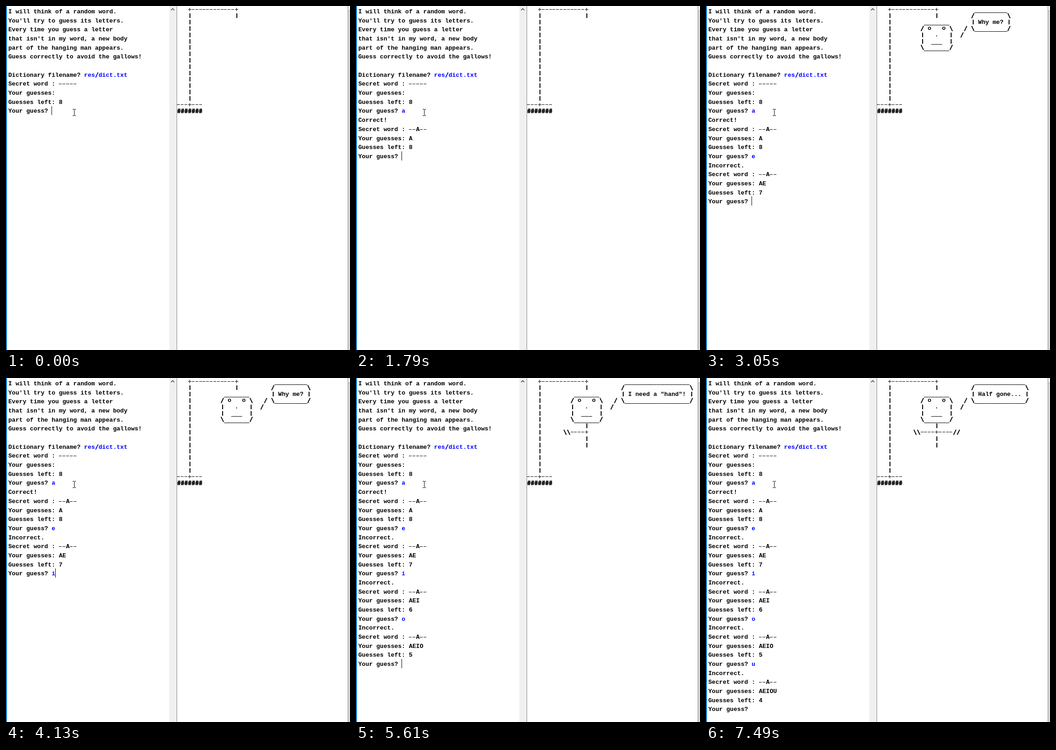
An HTML page with a canvas that plays this animation: 748x748 px, repeating every 7.99 s.

```html
<!DOCTYPE html>
<html lang="en">
<head>
<meta charset="utf-8">
<title>Hangman</title>
<style>
  html, body { margin: 0; width: 100%; height: 100%; overflow: hidden; background: #fff; }
  canvas { display: block; }
</style>
</head>
<body>
<canvas id="stage" width="748" height="748"></canvas>
<script>
const ctx = document.getElementById('stage').getContext('2d');
const LOOP = 7990;
const CELL = 7.85;
const LINE = 19.68;
const ROW = 13.8;
const BLUE = '#0000ff';

const INTRO = [
  'I will think of a random word.',
  "You'll try to guess its letters.",
  'Every time you guess a letter',
  "that isn't in my word, a new body",
  'part of the hanging man appears.',
  'Guess correctly to avoid the gallows!',
  ''
];
const LETTERS = 'aeiou';
const SPEECH = ['Why me?', "I'm scared!", 'I need a "hand"!', 'Half gone...'];

// [start ms, rounds finished, letter typed, caret shown]
const STEPS = [
  [0, 0, 0, 1], [410, 0, 0, 0], [970, 0, 0, 1], [1350, 0, 1, 1],
  [1790, 1, 0, 1], [2290, 1, 0, 0], [2670, 1, 1, 1],
  [3050, 2, 0, 1], [3550, 2, 0, 0], [4050, 2, 0, 1], [4130, 2, 1, 1],
  [4470, 3, 0, 1], [4990, 3, 0, 0], [5230, 3, 1, 1],
  [5610, 4, 0, 1], [6110, 4, 0, 0], [6490, 4, 1, 1],
  [6990, 5, 0, 1], [7490, 5, 0, 0]
];

function rect(color, x, y, w, h) {
  ctx.fillStyle = color;
  ctx.fillRect(x, y, w, h);
}

function stroke(color, width, ...points) {
  ctx.strokeStyle = color;
  ctx.lineWidth = width;
  ctx.beginPath();
  points.forEach(([x, y], i) => i ? ctx.lineTo(x, y) : ctx.moveTo(x, y));
  ctx.stroke();
}

// Line-like characters are drawn as strokes; x is the cell's left, y its middle.
function glyph(ch, x, y, color) {
  const mid = Math.floor(x + CELL / 2);
  const my = Math.round(y);
  const top = Math.floor(y) - 4;
  switch (ch) {
    case ' ': break;
    case '-': rect(color, mid - 3, my, 6, 1); break;
    case '+':
      rect(color, mid - 3, my, 7, 1);
      rect(color, mid, my - 3, 1, 7);
      break;
    case '_': rect(color, x, Math.floor(y + 7.3), CELL + 0.1, 1); break;
    case '|': rect(color, mid, top, 2, 10); break;
    case '/': stroke(color, 1.8, [x + 1.5, top + 10.5], [x + 6.8, top - 0.5]); break;
    case '\\': stroke(color, 1.8, [x + 1.5, top - 0.5], [x + 6.8, top + 10.5]); break;
    case '#':
      stroke(color, 2, [x + 2, my + 5], [x + 3.3, my - 5]);
      stroke(color, 2, [x + 4.8, my + 5], [x + 6.1, my - 5]);
      rect(color, x + 0.4, my - 2, 7.2, 1.5);
      rect(color, x + 0.4, my + 1, 7.2, 1.5);
      break;
    default:
      ctx.fillStyle = color;
      ctx.fillText(ch, x, Math.round(y + 4));
  }
}

function write(str, x, y, color = '#000') {
  [...str].forEach((ch, i) => glyph(ch, x + i * CELL, y, color));
}

function art(row, col, str) {
  write(str, 372 + col * CELL, 7 + row * ROW);
}

function bars(col, from, to) {
  for (let r = from; r <= to; r++) art(r, col, '|');
}

function drawFrame() {
  rect('#fff', 0, 0, 748, 748);
  rect('#0078d7', 0, 0, 2, 748);
  rect('#f0f0f0', 355, 0, 16, 748);
  rect('#828282', 371, 0, 1, 748);
  rect('#828282', 743, 0, 1, 748);
  rect('#f0f0f0', 744, 0, 4, 10);
  rect('#a8a8a8', 744, 10, 4, 1);
  rect('#d8d8d8', 744, 11, 4, 737);
  stroke('#505050', 1.7, [359, 9.2], [362.5, 5.7], [366, 9.2]);
}

function drawConsole(rounds, typed, caret) {
  let n = 0;
  const line = (text, answer = '') => {
    const y = 12 + LINE * n++;
    write(text, 5, y);
    write(answer, 5 + text.length * CELL, y, BLUE);
  };
  INTRO.forEach(text => line(text));
  line('Dictionary filename? ', 'res/dict.txt');
  for (let r = 0; r <= rounds; r++) {
    if (r) line(r === 1 ? 'Correct!' : 'Incorrect.');
    line('Secret word : ' + (r ? '--A--' : '-----'));
    line('Your guesses: ' + LETTERS.slice(0, r).toUpperCase());
    line('Guesses left: ' + (8 - Math.max(0, r - 1)));
    line('Your guess? ', r < rounds || typed ? LETTERS[r] : '');
  }
  if (caret) {
    const top = 218 + 5 * LINE * rounds;
    const y = Math.floor(top);
    rect('#000', typed ? 107 : 99, y, 1, Math.floor(top + LINE) - y);
  }
}

function drawPointer() {
  rect('#000', 148, 225, 1, 13);
  for (const y of [224, 238]) {
    rect('#000', 145, y, 3, 1);
    rect('#000', 149, y, 3, 1);
  }
}

function drawGallows(misses) {
  art(0, 3, '+------------+');
  bars(3, 1, 14);
  bars(16, 1, 1);
  art(15, 0, '---+---');
  art(16, 0, '#######');
  if (misses < 1) return;

  const words = SPEECH[misses - 1];
  const rule = '_'.repeat(words.length + 2);
  const gap = ' '.repeat(words.length + 2);
  art(0, 27, rule);
  art(1, 26, '/' + gap + '\\');
  art(2, 26, '| ' + words + ' |');
  art(3, 24, '/ \\' + rule + '/');
  art(4, 23, '/');

  art(2, 13, '_______');
  art(3, 12, '/ o   o \\');
  art(4, 12, '|   .   |');
  art(5, 12, '|  ___  |');
  art(6, 12, '\\_______/');
  if (misses < 2) return;

  bars(16, 7, 7);
  bars(16, 9, 10);
  if (misses === 2) bars(16, 8, 8);
  if (misses > 2) art(8, 10, '\\\\----+');
  if (misses > 3) art(8, 17, '----//');
}

let shown = null;
function tick() {
  const t = performance.now() % LOOP;
  const step = STEPS.findLast(s => s[0] <= t);
  if (step !== shown) {
    shown = step;
    const [, rounds, typed, caret] = step;
    ctx.font = 'bold 13.08px "Liberation Mono", "Courier New", monospace';
    drawFrame();
    drawConsole(rounds, typed, caret);
    drawPointer();
    drawGallows(rounds - 1);
  }
  requestAnimationFrame(tick);
}
tick();
</script>
</body>
</html>
```
